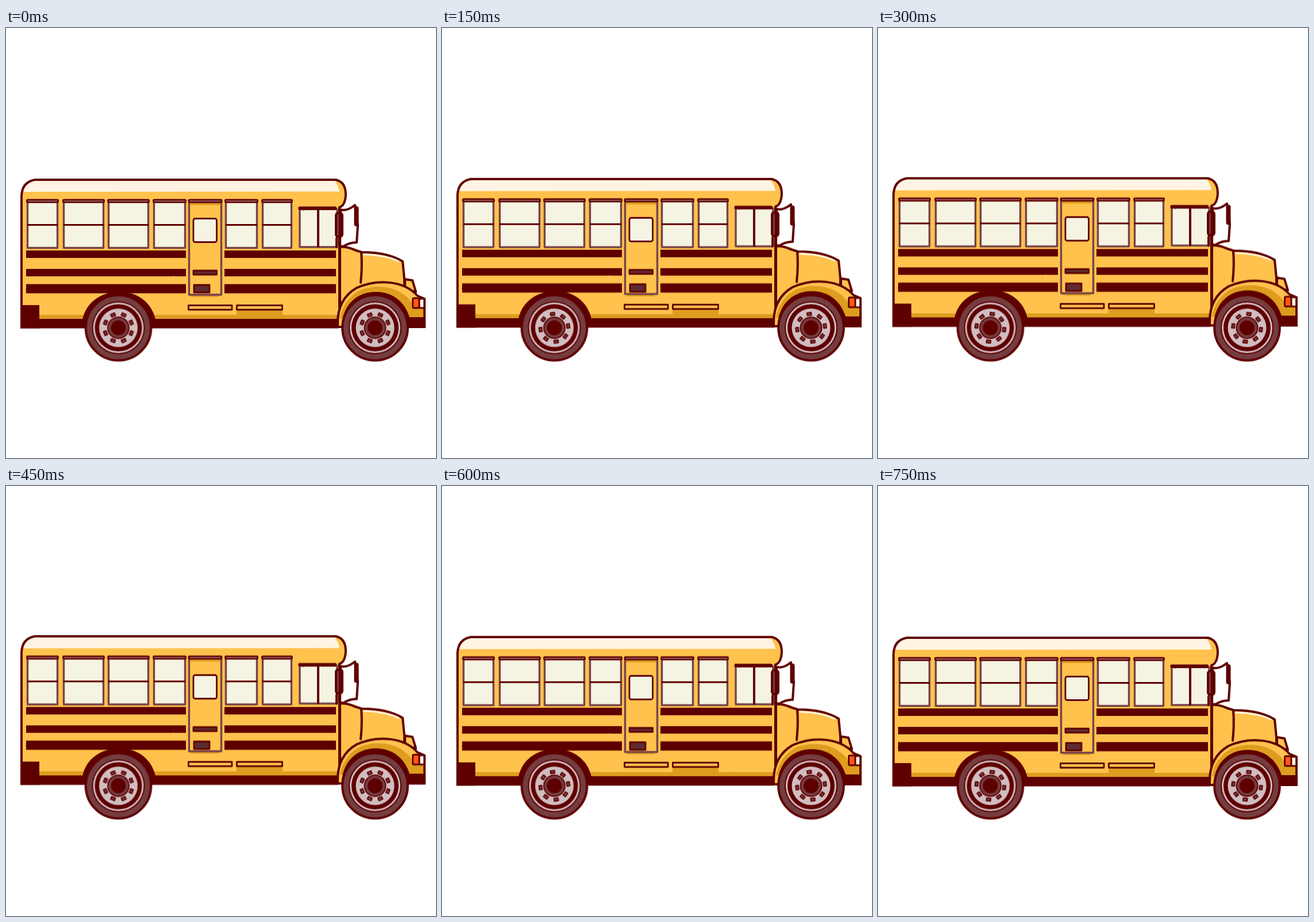
Recreate the animation shown at these times as an HTML page. Size 748 by 748 pixels, loop 900 ms.

```html
<!DOCTYPE html>
<html lang="en">
<head>
<meta charset="utf-8">
<title>School bus</title>
<style>
  html, body { margin: 0; width: 100%; height: 100%; overflow: hidden; background: #fff; }
  svg { display: block; width: 100vw; height: 100vh; }
  .dark { fill: #5f0000; }
  .mauve { fill: #743d40; }
  .plum { fill: #5e2b30; }
  .yellow { fill: #ffc24d; }
  .shade { fill: #de9d1f; }
  .cream { fill: #fff4e3; }
  .glass { fill: #f5f4e2; }
  .white { fill: #fff; }
  .metal { fill: #d0bdc1; }
  .orange { fill: #ff5a12; }
  .none { fill: none; }
  .ink { stroke: #5f0000; stroke-width: 4; stroke-linejoin: round; stroke-linecap: round; }
  .thin { stroke-width: 2.8; }
  .frame { stroke: #77424a; stroke-width: 3.4; stroke-linejoin: round; }
  .shine { fill: none; stroke: #fff4e3; stroke-width: 3; stroke-linecap: round; }
</style>
</head>
<body>
<svg viewBox="0 0 748 748">
  <defs>
    <filter id="pencil" x="0" y="240" width="748" height="360" filterUnits="userSpaceOnUse" color-interpolation-filters="sRGB">
      <feTurbulence type="fractalNoise" baseFrequency=".3" numOctaves="1" seed="4"/>
      <feDisplacementMap in="SourceGraphic" scale="1.6" xChannelSelector="R" yChannelSelector="G"/>
    </filter>
  </defs>
  <g id="body"><g id="bodyArt" filter="url(#pencil)"></g></g>
  <g id="wheels"></g>
</svg>
<script>
const rect = (cls, x1, y1, x2, y2, r = 0) =>
  `<rect class="${cls}" x="${x1}" y="${y1}" width="${x2 - x1}" height="${y2 - y1}" rx="${r}"/>`;
const path = (cls, d) => `<path class="${cls}" d="${d}"/>`;
const circle = (cls, r) => `<circle class="${cls}" r="${r}"/>`;

const shell = 'M27 520V292Q28 268 50 264H574Q591 268 591 290Q590 309 580 312V520Z';
const fender = 'M577 517C576 488 586 466 610 452C646 436 692 439 716 466L728 471V520H577Z';

function sideWindow([x1, x2]) {
  return rect('glass frame', x1 + 1.5, 302, x2 - 1.5, 382.5) +
    path('none ink thin', `M${x1 + 2} 342.5H${x2 - 2}`) +
    rect('metal ink thin', x1 + 0.5, 299, x2 - 0.5, 303, 1);
}

function cabin() {
  return path('yellow', shell) +
    path('cream', 'M28 285Q30 268 50 265H571Q578 273 580 284.5Z') +
    rect('shade', 58, 499, 579, 507) +
    rect('shade', 401, 489, 481, 505) +
    path('none ink', shell) +
    [[36, 91], [99, 171], [177, 249], [256, 313], [381, 438], [445, 498]].map(sideWindow).join('') +
    rect('glass frame', 511, 315, 576, 381) +
    path('none ink', 'M543 316V380') +
    rect('dark', 508.5, 310.5, 575, 316.5, 2) +
    [[387, 400], [419, 432], [445.5, 461.5]].map(([top, bottom]) =>
      rect('dark', 35, top, 313, bottom) + rect('dark', 380, top, 574, bottom)).join('');
}

function door() {
  return rect('shade', 321, 463, 370, 468, 2) +
    rect('yellow frame', 318.5, 301, 374.5, 464) +
    rect('shade', 320, 303, 373, 308) +
    rect('metal ink thin', 318, 299, 375, 303, 1) +
    rect('glass ink thin', 326, 331.5, 366.5, 372.5, 3) +
    rect('plum ink thin', 326, 422, 366.5, 429) +
    rect('plum ink thin', 327, 447, 354, 460) +
    rect('yellow ink thin', 317.5, 482.5, 393, 490) +
    rect('yellow ink thin', 401.5, 482.5, 480.5, 490);
}

function nose() {
  return path('yellow', 'M580 382H606L619 392V480H580Z') +
    path('yellow ink', 'M581 381Q593 380 606 386L619 390Q664 390 690 406L693 437V460H619') +
    path('shine', 'M623 394Q661 395 683 406') +
    path('none ink', 'M618 390Q620 415 617 443M581 381V480') +
    path('yellow ink', 'M694 437L707 439L713 459L694 455Z') +
    path('yellow ink', fender) +
    path('shade', 'M579 517C582 489 592 469 616 456C653 442 690 454 706 478L708 488H726V505H579Z') +
    path('dark', 'M584 521C584 486 607 459 643 459C676 459 695 480 702 503H730V522H584Z') +
    rect('orange ink thin', 707.5, 470, 719, 487, 2) +
    rect('cream ink thin', 719, 471, 727.5, 487, 1);
}

function mirrors() {
  return path('white ink', 'M582 316Q594 319 607 308L612 343L610 373Q597 373 587 380L581 379Z') +
    rect('dark', 605.5, 310, 613.5, 345, 4) +
    path('none ink', 'M575 366V381') +
    rect('dark', 572, 320, 587, 365, 6) +
    rect('mauve', 576, 324, 579, 361, 1.5);
}

function underside() {
  return rect('dark', 25, 506, 578, 522.5) +
    rect('dark', 25, 482, 58, 522.5) +
    path('dark', 'M133 507C139 478 164 459 197 459C229 459 253 477 260 507Z');
}

function wheel(x) {
  const lugs = Array.from({ length: 8 }, (_, i) =>
    `<rect class="mauve ink" style="stroke-width:2" x="-3.6" y="-26.6" width="7.2" height="4.8" transform="rotate(${i * 45 - 22.5})"/>`);
  return `<g transform="translate(${x} 521.5)">` +
    `<g filter="url(#pencil)" transform="translate(-374 -420)"><g transform="translate(374 420)">` +
    circle('mauve ink', 56.8) + circle('dark', 46) + circle('metal', 44) +
    circle('dark', 41) + circle('metal', 33.5) + '</g></g>' +
    `<g class="lugs">${lugs.join('')}</g>` +
    circle('dark', 19.5) + circle('mauve', 17.5) + circle('dark', 13) + '</g>';
}

document.getElementById('bodyArt').innerHTML = cabin() + door() + mirrors() + nose() + underside();
document.getElementById('wheels').innerHTML = [195.5, 642].map(wheel).join('');

const timing = { duration: 450, iterations: Infinity };
const animations = [
  document.getElementById('body').animate(
    { transform: ['translateY(0)', 'translateY(-2.6px)'] },
    { ...timing, direction: 'alternate', easing: 'steps(3, jump-none)' }),
  ...[...document.querySelectorAll('.lugs')].map(lugs => lugs.animate(
    { transform: ['rotate(0deg)', 'rotate(45deg)'] },
    { ...timing, easing: 'steps(3, end)' }))
];
animations.forEach(animation => { animation.startTime = document.timeline.currentTime; });
</script>
</body>
</html>
```
